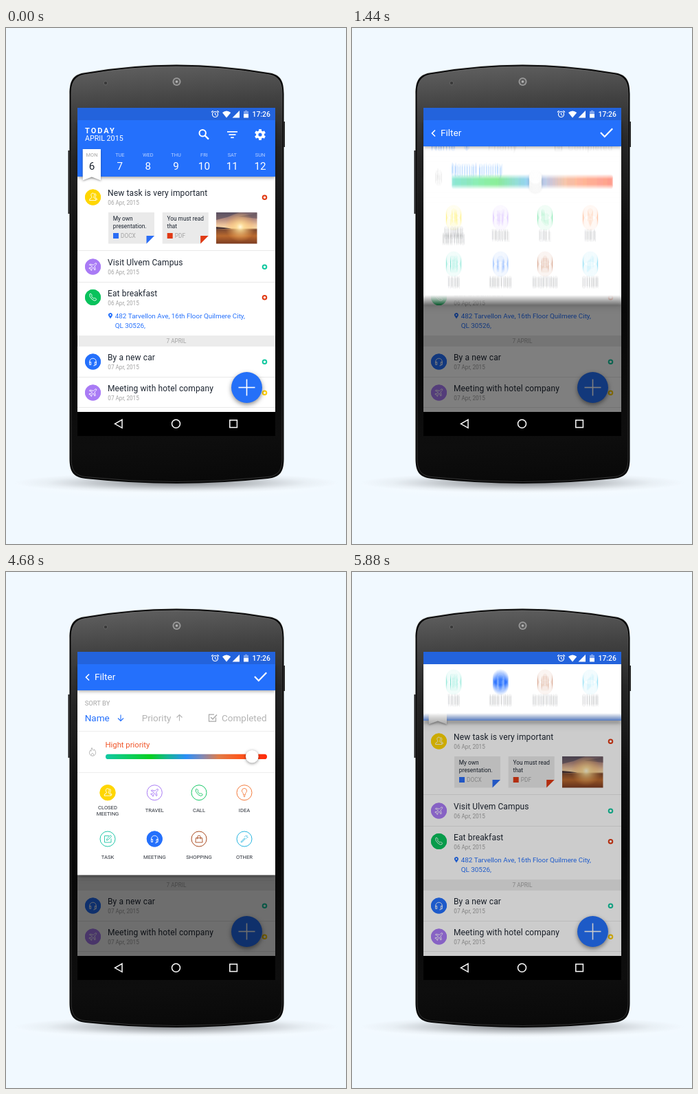
Write an HTML page with a canvas that moves like this. It is 495 by 750 pixels and loops after 6 s.

```html
<!DOCTYPE html>
<html lang="en">
<head>
<meta charset="utf-8">
<title>Task filter</title>
<style>
html, body { margin: 0; width: 100%; height: 100%; overflow: hidden; background: #f1f9ff; }
canvas { display: block; width: 100vw; height: 100vh; }
</style>
</head>
<body>
<canvas id="stage" width="495" height="750"></canvas>
<script>
const W = 495, H = 750, LOOP = 6000, STEP = 120;
const LEFT = 104, WIDE = 288, RIGHT = LEFT + WIDE, BASE = 558;
const BLUE = '#2470fc', RED = '#e03a14', TEAL = '#14c8a0', YELLOW = '#ffd600', PURPLE = '#a97bf5', GREEN = '#08c25c';
const INK = '#1c2430', GREY = '#a3a3a3';

const stage = document.getElementById('stage').getContext('2d');
const layer = () => Object.assign(document.createElement('canvas'), { width: W, height: H }).getContext('2d');
const home = layer(), panel = layer(), smear = layer();
let c = stage;

const GLYPHS = {
  people: 'M-5 4.5q0-3 3-3.6q1-.4 .2-1.6q-1.2-1.8-.8-3.4q.6-1.9 2.4-1.9t2.4 1.9q.4 1.6-.8 3.4q-.8 1.2 .2 1.6q3 .6 3 3.6zM2.4-5.4q2 .2 2 2q0 1.8-1 3q-.4 .9 .6 1.2q2 .5 2 2.7h-1',
  plane: 'M4.8-5.2q-1.2-.3-2.2 .8l-1.8 1.8l-5-1.2l-1 1l4.2 2.2l-2 2.2l-1.9-.2l-.8 .8l2.2 1.2l1.2 2.2l.8-.8l-.2-1.9l2.2-2l2.2 4.2l1-1l-1.2-5l1.8-1.8q1.1-1 .8-2.2z',
  phone: 'M-4.6-4.8q1.4-1.2 2.2 0l1 1.6q.4 .8-.6 1.6q.4 1.8 3.4 3.2q.9-1 1.7-.5l1.6 1q1 .8-.2 2.1q-2 1.8-5.8-1.4q-4.6-4-3.3-7.6z',
  bulb: 'M-1.6 3v-1.2q0-1-.9-2q-1.1-1.2-1.1-2.4a3.6 3.6 0 0 1 7.2 0q0 1.2-1.1 2.4q-.9 1-.9 2v1.2zM-1.4 4.6h2.8M-.8 6h1.6',
  pencil: 'M2-4.5h-6.5v9.5h9.5v-5.5M-1.5 2l.5-2.2l5-5.2l1.6 1.6l-5 5.2z',
  headset: 'M-4.8 2.5v-2.5a4.8 4.8 0 0 1 9.6 0v2.5M-4.8 .5h2v4h-2zM2.8 .5h2v4h-2zM3.8 4.5q0 1.4-3 1.4',
  bag: 'M-4.5-1.5h9l.6 6.5h-10.2zM-2.2 .4v-3.2a2.2 2.2 0 0 1 4.4 0v3.2',
  wand: 'M-5 4.2l5.5-5.5l1 1l-5.5 5.5zM2.5-5.5v2M5.5-2.5h-2M4.8-4.8l-1.2 1.2M0-4l.8 .8M4 0l-.8-.8',
  flame: 'M-1-6.5q.6 2.6 2.6 4q.9-.6 .8-1.8q2.2 2.2 2.2 5a4.6 4.6 0 0 1-9.2 0q0-2 1.4-3.6q.4 1.2 1.2 1.4q-.4-2.6 1-5zM-1.8 4.4q-.4-1.8 1.6-3.4q2 1.8 1.8 3.4'
};

// Drawing helpers
function text(s, x, y, size, color = INK, o = {}) {
  c.font = `${o.weight || 400} ${size}px Roboto, sans-serif`;
  c.letterSpacing = (o.space || 0) + 'px';
  c.textAlign = o.align || 'left';
  c.fillStyle = color;
  c.fillText(s, x, y);
}
const mid = (s, x, y, size, color, o) => text(s, x, y, size, color, { align: 'center', ...o });
function box(x, y, w, h, color) { c.fillStyle = color; c.fillRect(x, y, w, h); }
function disc(x, y, r, color) { c.beginPath(); c.arc(x, y, r, 0, 7); c.fillStyle = color; c.fill(); }
function ring(x, y, r, color, lw) { c.beginPath(); c.arc(x, y, r, 0, 7); c.strokeStyle = color; c.lineWidth = lw; c.stroke(); }
function trace(pts, close) {
  c.beginPath();
  for (let i = 0; i < pts.length; i += 2) c.lineTo(pts[i], pts[i + 1]);
  if (close) c.closePath();
}
function line(pts, color, lw, close) { trace(pts, close); c.strokeStyle = color; c.lineWidth = lw; c.stroke(); }
function poly(pts, color) { trace(pts, true); c.fillStyle = color; c.fill(); }
function fade(x0, y0, x1, y1, stops) {
  const g = c.createLinearGradient(x0, y0, x1, y1);
  stops.forEach(([p, col]) => g.addColorStop(p, col));
  return g;
}
function glyph(kind, x, y, color, lw = 0.9) {
  c.save();
  c.translate(x, y);
  c.strokeStyle = color;
  c.lineWidth = lw;
  c.lineJoin = 'round';
  c.stroke(new Path2D(GLYPHS[kind]));
  c.restore();
}
function tile(kind, x, y, color, fill) {
  ring(x, y, 11, color, 1);
  glyph(kind, x, y, color);
  c.globalAlpha = fill;
  disc(x, y, 11.5, color);
  glyph(kind, x, y, '#fff');
  c.globalAlpha = 1;
}
function lifted(blur, dy, alpha, draw) {
  c.save();
  c.shadowColor = `rgba(0,0,0,${alpha})`;
  c.shadowBlur = blur;
  c.shadowOffsetY = dy;
  draw();
  c.restore();
}

// Timing helpers
const clamp = v => Math.min(1, Math.max(0, v));
const ease = v => { v = clamp(v); return v * v * (3 - 2 * v); };
function key(t, frames) {
  const i = frames.findIndex(f => f[0] > t);
  if (i < 0) return frames[frames.length - 1][1];
  if (!i) return frames[0][1];
  const [a, u] = frames[i - 1], [b, v] = frames[i];
  return u + (v - u) * (t - a) / (b - a);
}
function ripple(t, x, y, from, to, alpha) {
  if (t < from || t >= to) return;
  disc(x, y, 17 * Math.sin((t - from) / (to - from) * 1.7), `rgba(0,0,0,${alpha})`);
}

function body(d) {
  const l = 92.5 + d, r = 404.5 - d, t = 65 + d, b = 655 - d;
  c.beginPath();
  c.moveTo(l, 96);
  c.bezierCurveTo(l, 76 + d, 98 + d, 67 + d, 116, t);
  c.quadraticCurveTo(248, 42 + d, 381, t);
  c.bezierCurveTo(399 - d, 67 + d, r, 76 + d, r, 96);
  c.lineTo(r, 626);
  c.bezierCurveTo(r, 645 - d, 399 - d, 653 - d, 381, b);
  c.quadraticCurveTo(248, 669 - d, 116, b);
  c.bezierCurveTo(98 + d, 653 - d, l, 645 - d, l, 626);
  c.closePath();
}
function glow(y, rx, ry, stops) {
  c.save();
  c.translate(248, y);
  c.scale(rx, ry);
  const g = c.createRadialGradient(0, 0, 0, 0, 0, 1);
  stops.forEach(([p, col]) => g.addColorStop(p, col));
  disc(0, 0, 1, g);
  c.restore();
}
function handset() {
  box(0, 0, W, H, '#f1f9ff');
  glow(664, 248, 22, [[0, 'rgba(255,255,255,.6)'], [1, 'rgba(255,255,255,0)']]);
  glow(661, 236, 15, [[0, 'rgba(50,54,60,.62)'], [0.5, 'rgba(80,84,90,.3)'], [0.8, 'rgba(110,114,120,.08)'], [1, 'rgba(120,124,130,0)']]);
  box(90.5, 178, 4, 92, '#161616');
  box(402, 136, 4, 37, '#161616');
  c.save();
  c.translate(0, -1);
  body(0);
  c.fillStyle = '#d2d7da';
  c.fill();
  c.restore();
  body(0);
  c.fillStyle = '#080808';
  c.fill();
  body(2.5);
  c.fillStyle = fade(200, 52, 240, 662, [[0, '#606060'], [0.1, '#414141'], [0.22, '#242424'], [0.4, '#101010'], [0.6, '#080808'], [0.9, '#0e0e0e'], [1, '#090909']]);
  c.fill();
  c.strokeStyle = fade(0, 52, 0, 662, [[0, '#777'], [0.15, '#3a3a3a'], [0.5, '#1c1c1c'], [1, '#3c3c3c']]);
  c.lineWidth = 0.8;
  c.stroke();
  disc(145, 80, 3, '#3a3a3a');
  ring(145, 80, 2.8, '#707070', 0.8);
  disc(248.5, 78, 6, '#9a9a9a');
  disc(248.5, 78, 4.2, '#5c5c5c');
  disc(248.5, 78, 1.8, '#b5b5b5');
}

function statusBar() {
  box(LEFT, 116, WIDE, 18, '#2363dc');
  ring(304.5, 125.5, 4, '#fff', 1.2);
  line([304.5, 123, 304.5, 126, 306.5, 127], '#fff', 1);
  line([299, 122.5, 301.5, 120.3], '#fff', 1.2);
  line([310, 122.5, 307.5, 120.3], '#fff', 1.2);
  c.beginPath();
  c.moveTo(321, 130.5);
  c.lineTo(315, 123);
  c.quadraticCurveTo(321, 117.8, 327.3, 123);
  c.fillStyle = '#fff';
  c.fill();
  poly([329.5, 130.5, 340, 120, 340, 130.5], '#fff');
  box(346, 121, 7, 4, '#7da3ee');
  box(348, 119.8, 3, 1.5, '#7da3ee');
  box(346, 125, 7, 5.5, '#fff');
  text('17:26', 358.5, 129, 10.4, '#fff', { weight: 500 });
}
function navBar() {
  box(LEFT, BASE, WIDE, 35, '#000');
  line([158.5, 575.3, 169, 569.3, 169, 581.3], '#fff', 1.5, true);
  ring(247.5, 575.3, 6, '#fff', 1.5);
  c.strokeRect(325.8, 570, 10.6, 10.6);
}

function header() {
  lifted(5, 1.5, 0.4, () => box(LEFT, 134, WIDE, 82, BLUE));
  text('TODAY', 115, 152.7, 11, '#fff', { weight: 700, space: 2 });
  text('APRIL 2015', 115, 164.3, 10.7, '#fff');
  ring(286.2, 152.8, 4.7, '#fff', 2);
  line([289.6, 156.2, 295, 161.6], '#fff', 2.3);
  [7.5, 5, 2.3].forEach((w, i) => box(329.5 - w, 150 + i * 4.2, w * 2, 1.7, '#fff'));
  ring(370, 155, 4.3, '#fff', 3.4);
  for (let i = 0; i < 6; i++) {
    const a = i * Math.PI / 3 + Math.PI / 6, x = Math.cos(a), y = Math.sin(a);
    line([370 + 5 * x, 155 + 5 * y, 370 + 8 * x, 155 + 8 * y], '#fff', 3.8);
  }
  lifted(3, 1, 0.35, () => poly([111.7, 176, 138, 176, 138, 221.5, 124.9, 216.5, 111.7, 221.5], '#fff'));
  'MON TUE WED THU FRI SAT SUN'.split(' ').forEach((d, i) => {
    const x = 125 + i * 40.85;
    mid(d, x, 187, 7.4, i ? '#b9d1ff' : GREY);
    mid(6 + i, x, 205.7, 15.2, i ? '#fff' : INK);
  });
}
function card(x, lines, type, color) {
  poly([x, 268, x + 67, 268, x + 67, 302, x + 55.5, 313.5, x, 313.5], '#eaeaea');
  poly([x + 55.5, 302, x + 67, 302, x + 55.5, 313.5], color);
  lines.forEach((s, i) => text(s, x + 6.7, 279.7 + i * 11.3, 8.35));
  box(x + 7, 298, 8, 8, color);
  text(type, x + 18, 305.2, 8.3, GREY);
}
function photo() {
  c.save();
  c.beginPath();
  c.rect(306, 268, 59.5, 45.5);
  c.clip();
  box(306, 268, 60, 46, fade(0, 268, 0, 313.5, [[0, '#75646f'], [0.22, '#b58c80'], [0.4, '#edc49c'], [0.5, '#f6d9a8'], [0.55, '#7e4a30'], [0.75, '#b8692f'], [1, '#7c3c22']]));
  poly([306, 268, 340, 268, 322, 275, 306, 279], 'rgba(70,66,88,.55)');
  poly([338, 274, 366, 269, 366, 277], 'rgba(84,70,84,.5)');
  const g = c.createRadialGradient(341, 289, 0, 341, 289, 22);
  g.addColorStop(0, '#fff8dc');
  g.addColorStop(0.25, 'rgba(255,222,150,.8)');
  g.addColorStop(1, 'rgba(255,170,80,0)');
  box(306, 268, 60, 46, g);
  poly([306, 289, 317, 290, 328, 291.5, 306, 292.5], '#4a3434');
  c.restore();
}
function list() {
  box(LEFT, 134, WIDE, BASE - 134, '#fff');
  [323.5, 369.5, 507.5, 551.5].forEach(y => line([LEFT, y, RIGHT, y], '#e9e9e9', 1));
  box(LEFT, 447, WIDE, 16, '#ececec');
  mid('7 APRIL', 248, 458.3, 8.2, GREY);
  [
    ['people', 246, YELLOW, 'New task is very important', '06', RED],
    ['plane', 347, PURPLE, 'Visit Ulvem Campus', '06', TEAL],
    ['phone', 391.5, GREEN, 'Eat breakfast', '06', RED],
    ['headset', 485, BLUE, 'By a new car', '07', TEAL],
    ['plane', 530, PURPLE, 'Meeting with hotel company', '07', '#ffcf00']
  ].forEach(([kind, y, color, title, day, dot]) => {
    tile(kind, 126.5, y, color, 1);
    text(title, 148, y - 2, 12, INK, { space: 0.13 });
    text(day + ' Apr, 2015', 148.3, y + 11.3, 8.2, GREY);
    ring(376.5, y + 0.3, 2.8, dot, 2);
  });
  card(149, ['My own', 'presentation.'], 'DOCX', '#2a6df5');
  card(227.7, ['You must read', 'that'], 'PDF', RED);
  photo();
  c.beginPath();
  c.arc(152, 417.2, 3, Math.PI * 0.85, Math.PI * 2.15);
  c.lineTo(152, 422.6);
  c.fillStyle = BLUE;
  c.fill();
  disc(152, 417.2, 1.1, '#fff');
  text('482 Tarvellon Ave, 16th Floor Quilmere City,', 158.7, 421.6, 9.9, BLUE);
  text('QL 30526,', 158.7, 436.4, 9.9, BLUE);
}
function addButton() {
  lifted(6, 2.5, 0.45, () => disc(350.5, 522.5, 22.5, '#2470f8'));
  line([338.5, 522.5, 362.5, 522.5], '#fff', 1.6);
  line([350.5, 510.5, 350.5, 534.5], '#fff', 1.6);
}

function slider(t) {
  const x = 267 + 66 * ease((t - 3480) / 600) + 39 * ease((t - 4320) / 600);
  const [label, color] = x < 300 ? ['Normal priority', '#2f88f0']
    : x < 366 ? ['Hight priority', '#f0562a'] : ['Very hight priority', '#e63e1a'];
  glyph('flame', 126, 262, '#b0b0b0');
  text(label, 144.5, 255, 11.3, color);
  c.beginPath();
  c.roundRect(145, 264.7, 235, 7.4, 3.7);
  c.fillStyle = fade(145, 0, 380, 0, [[0, '#12c8a4'], [0.14, '#0ccd62'], [0.28, '#08cf20'], [0.38, '#14b690'], [0.5, '#2a8ff8'], [0.6, '#8288b4'], [0.7, '#e07c48'], [0.82, '#fb5a20'], [1, '#ff2a0a']]);
  c.fill();
  lifted(4, 1, 0.45, () => disc(x, 268.2, 9.3, '#fff'));
}
function arrow(x, y, dir, color) {
  line([x, y - 4.5, x, y + 4.5], color, 1.1);
  line([x - 4, y + dir * 0.5, x, y + dir * 4.5, x + 4, y + dir * 0.5], color, 1.1);
}
function drawPanel(t) {
  c = panel;
  c.clearRect(0, 0, W, H);
  lifted(7, 2, 0.5, () => box(LEFT, 172, WIDE, 268.5, '#fff'));
  text('SORT BY', 114.7, 194, 9.4, GREY);
  text('Name', 114.7, 216.7, 13.5, BLUE);
  arrow(167, 212, 1, BLUE);
  text('Priority', 197.7, 216.7, 13.5, '#b4b4b4');
  arrow(252.5, 212, -1, '#b4b4b4');
  line([305.5, 211.5, 305.5, 217.2, 295.5, 217.2, 295.5, 207.2, 303, 207.2], '#a8a8a8', 1.2);
  line([298, 211, 301, 214, 307, 207.5], '#a8a8a8', 1.4);
  text('Completed', 314, 216.7, 13.5, '#b4b4b4');
  [231.5, 291.5].forEach(y => line([LEFT, y, RIGHT, y], '#ededed', 1));
  slider(t);
  const closed = clamp((t - 2160) / 360), meeting = clamp((t - 2880) / 360);
  [
    ['people', YELLOW, 'CLOSED MEETING', closed], ['plane', PURPLE, 'TRAVEL', 0],
    ['phone', '#15c765', 'CALL', 0], ['bulb', '#f47b3c', 'IDEA', 0],
    ['pencil', '#1fc7a8', 'TASK', 0], ['headset', BLUE, 'MEETING', meeting],
    ['bag', '#a8491e', 'SHOPPING', 0], ['wand', '#27b5e0', 'OTHER', 0]
  ].forEach(([kind, color, label, fill], i) => {
    const x = [148, 216.3, 281, 347][i % 4], y = i < 4 ? 320.7 : 388, words = label.split(' ');
    tile(kind, x, y, color, fill);
    words.forEach((s, j) => mid(s, x, y + 28.6 + (j * 2 - words.length + 1) * 4.7, 7.6, '#2a2f38'));
  });
  ripple(t, 148, 320.5, 1900, 2500, 0.27);
  ripple(t, 216, 388, 2740, 3200, 0.27);
  c = stage;
}
function showPanel(t) {
  const opening = t < 3000;
  const y = opening ? key(t, [[1200, -250], [1320, -170], [1440, -45], [1560, 0]])
    : key(t, [[5520, 0], [5640, -12], [5760, -105], [5880, -228]]);
  const dim = opening ? key(t, [[1200, 0.05], [1320, 0.21], [1440, 0.5], [1560, 0.57]])
    : key(t, [[5520, 0.57], [5760, 0.4], [5880, 0.2]]);
  const blur = opening ? key(t, [[1200, 12], [1320, 18], [1440, 14], [1560, 0]])
    : key(t, [[5520, 0], [5640, 4], [5760, 15], [5880, 14]]);
  const bar = opening ? key(t, [[1200, 0.5], [1320, 1]]) : +(t < 5880);
  const ink = opening ? key(t, [[1200, 0.4], [1320, 0.72], [1440, 1]]) : key(t, [[5640, 1], [5760, 0.7]]);

  drawPanel(t);
  c.save();
  c.beginPath();
  c.rect(LEFT, 134, WIDE, BASE - 134);
  c.clip();
  box(LEFT, opening && t < 1320 ? 172 : 134, WIDE, BASE, `rgba(0,0,0,${dim})`);
  if (blur) {
    smear.clearRect(0, 0, W, H);
    smear.globalCompositeOperation = 'lighter';
    smear.globalAlpha = 1 / 17;
    for (let i = -8; i <= 8; i++) smear.drawImage(panel.canvas, 0, y + i * blur / 16);
    c.drawImage(smear.canvas, 0, 0);
  } else {
    c.drawImage(panel.canvas, 0, 0);
  }
  c.globalAlpha = bar;
  if (bar) lifted(5, 1.5, 0.35, () => box(LEFT, 134, WIDE, 38, BLUE));
  c.globalAlpha = bar * ink;
  ripple(t, 370, 152, 5020, 5600, 0.14);
  line([121, 148.5, 116.5, 153, 121, 157.5], '#fff', 1.6);
  text('Filter', 129, 157, 13.6, '#fff');
  line([362, 152, 367.8, 158, 379.2, 146.2], '#fff', 2.2);
  c.restore();
}

function draw(t) {
  c = stage;
  c.drawImage(home.canvas, 0, 0);
  ripple(t, 329.5, 155, 460, 1060, 0.14);
  if (t >= 1200) showPanel(t);
}

c = home;
handset();
list();
header();
addButton();
statusBar();
navBar();

let last = -1;
function tick() {
  const t = Math.floor(performance.now() % LOOP / STEP) * STEP;
  if (t !== last) draw(last = t);
  requestAnimationFrame(tick);
}
tick();
</script>
</body>
</html>
```
